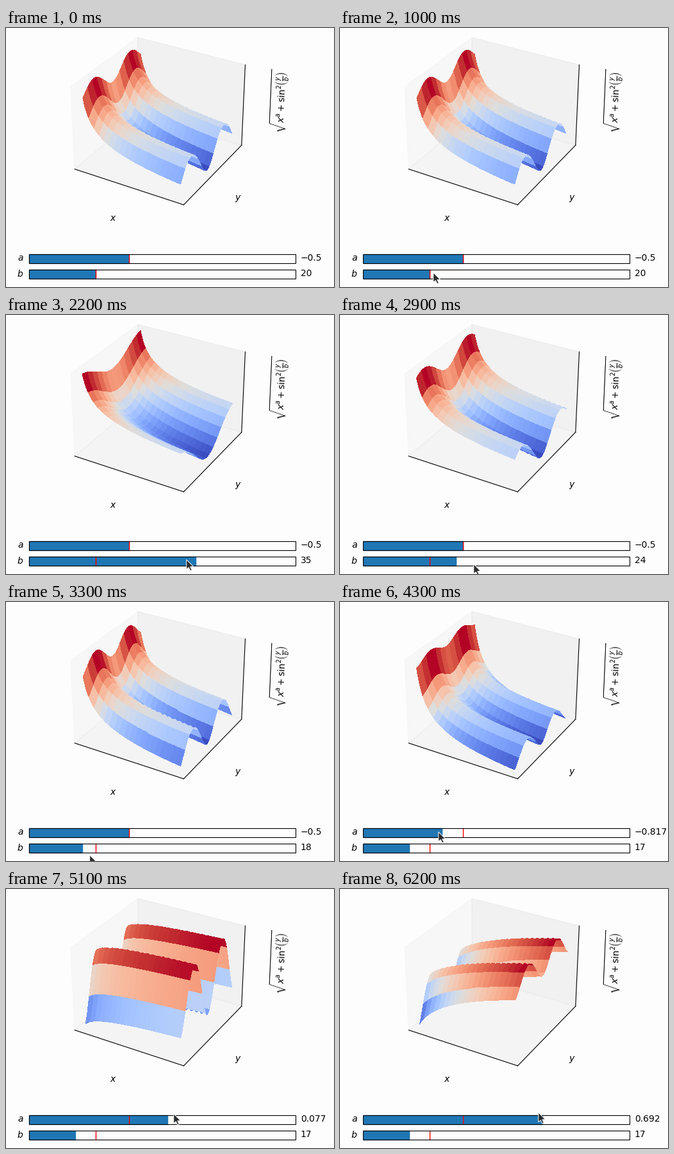
Write a matplotlib script that moves like this. It is 512x403 px and loops after 6.4 s.

```python
import numpy as np
import matplotlib.pyplot as plt
from matplotlib.animation import FuncAnimation
from matplotlib.collections import PolyCollection
from matplotlib.patches import Polygon, Rectangle

plt.rcParams["font.family"] = "DejaVu Sans"
plt.rcParams["font.size"] = 10

W, H, DPI = 512, 403, 100
FRAMES, INTERVAL = 64, 100

# Camera: 30 degrees up, 60 degrees to the left, ten units away.
ELEV, AZIM, DIST = np.radians(30), np.radians(-60), 10
SCALE, CX, CY = 1637, 239.9, 138.7
HALF_XY, HALF_Z = 0.5714, 0.4286
PANE = 25 / 24

# Surface patches per side and samples along each patch.
X_CELLS, X_FINE = 19, 5
Y_CELLS, Y_FINE = 13, 8

# Sliders in pixels.
LEFT, LENGTH, TRACK_H = 35.5, 416, 14
A_RANGE, A_START = (-2, 2), -0.5
B_RANGE, B_START = (10, 50), 20

# Pointer turning points: frame, x, y.
PATH = [(6, 138, 397), (8, 138, 380), (10, 146, 381), (11, 146, 381),
        (24, 307, 381), (33, 131, 394), (35, 111, 391), (37, 190, 361),
        (43, 154, 358), (45, 118, 357), (51, 262, 350), (55, 314, 348),
        (60, 314, 348), (62, 310, 348)]
ENTER = PATH[0][0]
B_DRAG, A_DRAG = (11, 35), (37, 60)
ARROW = np.array([(0, 0), (0, 15), (3.5, 12), (6, 17.4),
                  (8.5, 16.2), (6, 11), (11, 11)]) - 0.3


def pointer(frame):
    times, px, py = zip(*PATH)
    return np.interp(frame, times, px), np.interp(frame, times, py)


def dragged(frame, drag, grip, limits):
    """Slider value under the pointer, frozen outside the drag."""
    x = pointer(np.clip(frame, *drag))[0] + grip
    low, high = limits
    return low + (high - low) * round(x - LEFT - 0.5) / LENGTH


def project(x, y, z):
    """Box coordinates to pixels, plus the distance from the eye."""
    ce, se, ca, sa = np.cos(ELEV), np.sin(ELEV), np.cos(AZIM), np.sin(AZIM)
    right = -sa * x + ca * y
    up = -se * ca * x - se * sa * y + ce * z
    depth = DIST - (ce * ca * x + ce * sa * y + se * z)
    return CX + SCALE * right / depth, CY - SCALE * up / depth, depth


def corner(sx, sy, sz):
    return project(sx * HALF_XY * PANE, sy * HALF_XY * PANE, sz * HALF_Z * PANE)[:2]


nx, ny = X_CELLS * X_FINE + 1, Y_CELLS * Y_FINE + 1
xs, ys = np.meshgrid(np.linspace(0.1, 2, nx), np.linspace(-50, 50, ny))
edge = HALF_XY / 1.1
box_x, box_y = np.meshgrid(np.linspace(-edge, edge, nx), np.linspace(-edge, edge, ny))


def outline(row, col):
    """Sample indices around one patch."""
    i0, j0 = row * Y_FINE, col * X_FINE
    i1, j1 = i0 + Y_FINE, j0 + X_FINE
    ring = [(i0, j) for j in range(j0, j1)]
    ring += [(i, j1) for i in range(i0, i1)]
    ring += [(i1, j) for j in range(j1, j0, -1)]
    ring += [(i, j0) for i in range(i1, i0, -1)]
    return [i * nx + j for i, j in ring]


patches = np.array([outline(r, c) for r in range(Y_CELLS) for c in range(X_CELLS)])


def surface(a, b):
    """Polygons from back to front with their colours."""
    z = np.sqrt(xs**a + np.sin(ys / b) ** 2)
    box_z = ((z - z.min()) / np.ptp(z) * 2 - 1) * HALF_Z
    px, py, depth = project(box_x, box_y, box_z)
    points = np.column_stack([px.ravel(), py.ravel()])
    level = z.ravel()[patches].mean(axis=1)
    level = (level - level.min()) / np.ptp(level)
    order = np.argsort(-depth.ravel()[patches].mean(axis=1), kind="stable")
    return points[patches[order]], plt.colormaps["coolwarm"](level[order])


def number(value):
    """Shortest form that stays within a thousandth, three decimals at most."""
    digits = next((d for d in range(3) if abs(value - round(value, d)) < 1e-3), 3)
    return f"{value:.{digits}f}".replace("-", "\u2212")


fig = plt.figure(figsize=(W / DPI, H / DPI), dpi=DPI, facecolor="#fefdfe")
ax = fig.add_axes([0, 0, 1, 1])
ax.set(xlim=(0, W), ylim=(H, 0))
ax.axis("off")

# Panes at low x, high y and low z, then the three axis lines.
square = [(-1, -1), (1, -1), (1, 1), (-1, 1)]
for axis, (sign, grey) in enumerate([(-1, 0.95), (1, 0.9), (-1, 0.925)]):
    tint = (grey, grey, grey, 0.5)
    points = [corner(*np.insert(s, axis, sign)) for s in square]
    ax.add_patch(Polygon(points, fc=tint, ec=tint, lw=1, zorder=1))
ends = [corner(*s) for s in [(-1, -1, -1), (1, -1, -1), (1, 1, -1), (1, 1, 1)]]
for start, end in zip(ends, ends[1:]):
    ax.plot(*zip(start, end), color="black", lw=0.8, zorder=2)

mesh = PolyCollection([], linewidths=0, edgecolors="none", antialiaseds=False, zorder=3)
ax.add_collection(mesh, autolim=False)

ax.text(167, 300, "$x$", ha="center", va="baseline")
ax.text(362, 268, "$y$", ha="center", va="baseline")
ax.text(427, 113.5, r"$\sqrt{x^a + \mathrm{sin}^2\left(\frac{y}{b}\right)}$",
        ha="center", va="center", rotation=87.5)


def share(value, limits):
    return (value - limits[0]) / (limits[1] - limits[0])


def slider(top, name, start):
    """Track, fill and value text; the red line marks the starting value."""
    mid = top + TRACK_H / 2
    fill = Rectangle((LEFT, top), 0, TRACK_H, color="#1f77b4", lw=1, zorder=4)
    ax.add_patch(fill)
    mark = LEFT + LENGTH * start
    ax.plot([mark, mark], [top, top + TRACK_H], color="red", lw=1, zorder=5,
            solid_capstyle="butt")
    ax.add_patch(Rectangle((LEFT, top), LENGTH, TRACK_H, fill=False, ec="black",
                           lw=0.8, zorder=6))
    ax.text(LEFT - 0.02 * LENGTH, mid, f"${name}$", ha="right", va="center")
    return fill, ax.text(LEFT + 1.02 * LENGTH, mid, "", ha="left", va="center")


a_fill, a_text = slider(351.5, "a", share(A_START, A_RANGE))
b_fill, b_text = slider(375.5, "b", share(B_START, B_RANGE))

cursor = Polygon(ARROW, fc="#2b2b2b", ec="white", lw=0.7, zorder=9)
ax.add_patch(cursor)


def update(frame):
    # Slider b runs a little ahead of the drawn pointer, slider a behind it.
    a = dragged(frame - 0.5, A_DRAG, 2, A_RANGE)
    b = round(dragged(frame + 1, B_DRAG, -4, B_RANGE))

    verts, colors = surface(a, b)
    mesh.set_verts(verts)
    mesh.set_facecolor(colors)

    a_fill.set_width(LENGTH * share(a, A_RANGE))
    b_fill.set_width(LENGTH * share(b, B_RANGE))
    a_text.set_text(number(a))
    b_text.set_text(str(b))

    cursor.set_visible(frame >= ENTER)
    cursor.set_xy(ARROW + np.round(pointer(frame)))
    return mesh, a_fill, b_fill, a_text, b_text, cursor


anim = FuncAnimation(fig, update, frames=FRAMES, interval=INTERVAL,
                     init_func=lambda: update(0), repeat=True, repeat_delay=0,
                     blit=False)
plt.show()
```
